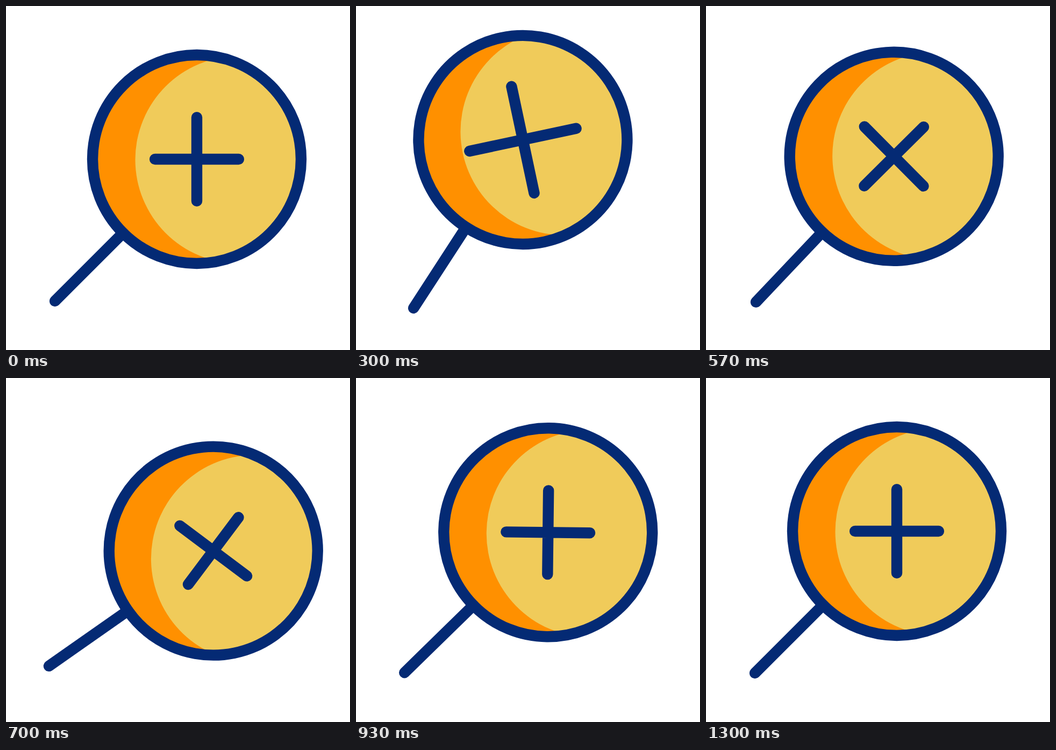
Recreate the animation shown at these times as an HTML page. Size 640x640 px, loop 2 s.

```html
<!DOCTYPE html>
<html lang="en">
<head>
<meta charset="utf-8">
<title>Zoom in</title>
<style>
  html, body { margin: 0; width: 100%; height: 100%; overflow: hidden; background: #fff; }
  svg { display: block; width: 100%; height: 100%; }
  .line { fill: none; stroke: #042a74; stroke-width: 20.4; stroke-linecap: round; }
</style>
</head>
<body>
<svg viewBox="0 0 640 640">
  <clipPath id="lens"><circle cx="355" cy="285" r="194"/></clipPath>
  <g id="glass">
    <circle cx="355" cy="285" r="194" fill="#ff9000"/>
    <circle cx="433.5" cy="286" r="193" fill="#f0cb5a" clip-path="url(#lens)"/>
    <circle class="line" cx="355" cy="285" r="194"/>
    <path class="line" d="M217.8 422.2L91 549"/>
    <path class="line" id="plus"/>
  </g>
</svg>
<script>
const LOOP = 2000, LAST = 39;
const glass = document.getElementById('glass');
const plus = document.getElementById('plus');

// Keys are [step, value] at 30 steps per second
const SWING = [[0, 0], [12, -16], [21, 10], [30, -2], [39, 0]];
const ARM = [[0, 77.9], [12, 109.2], [17, 77.9], [39, 77.9]];
const SPIN = { from: 11, to: 28, angle: 180 };

function track(keys, s) {
  const i = Math.max(1, keys.findIndex(k => k[0] >= s));
  const [s0, v0] = keys[i - 1], [s1, v1] = keys[i];
  return v0 + (v1 - v0) * (s - s0) / (s1 - s0);
}

// cubic-bezier(.42, 0, .58, 1), solved by bisection
function easeInOut(x) {
  let lo = 0, hi = 1;
  for (let i = 0; i < 24; i++) {
    const u = (lo + hi) / 2, v = 1 - u;
    if (1.26 * v * v * u + 1.74 * v * u * u + u * u * u < x) lo = u; else hi = u;
  }
  return lo * lo * (3 - 2 * lo);
}

function draw(ms) {
  const s = Math.min(LAST, Math.floor(Math.floor(ms / 10) * 0.3 + 0.15));
  const p = Math.min(1, Math.max(0, (s - SPIN.from) / (SPIN.to - SPIN.from)));
  const spin = p === 1 ? SPIN.angle : easeInOut(p) * SPIN.angle;
  const arm = track(ARM, s);
  glass.setAttribute('transform', `rotate(${track(SWING, s)} 161 479)`);
  plus.setAttribute('d', `M${-arm} 0H${arm}M0 ${-arm}V${arm}`);
  plus.setAttribute('transform', `translate(355 285) rotate(${spin})`);
}

const start = performance.now();
function tick() {
  draw((performance.now() - start) % LOOP);
  requestAnimationFrame(tick);
}
tick();
</script>
</body>
</html>
```
